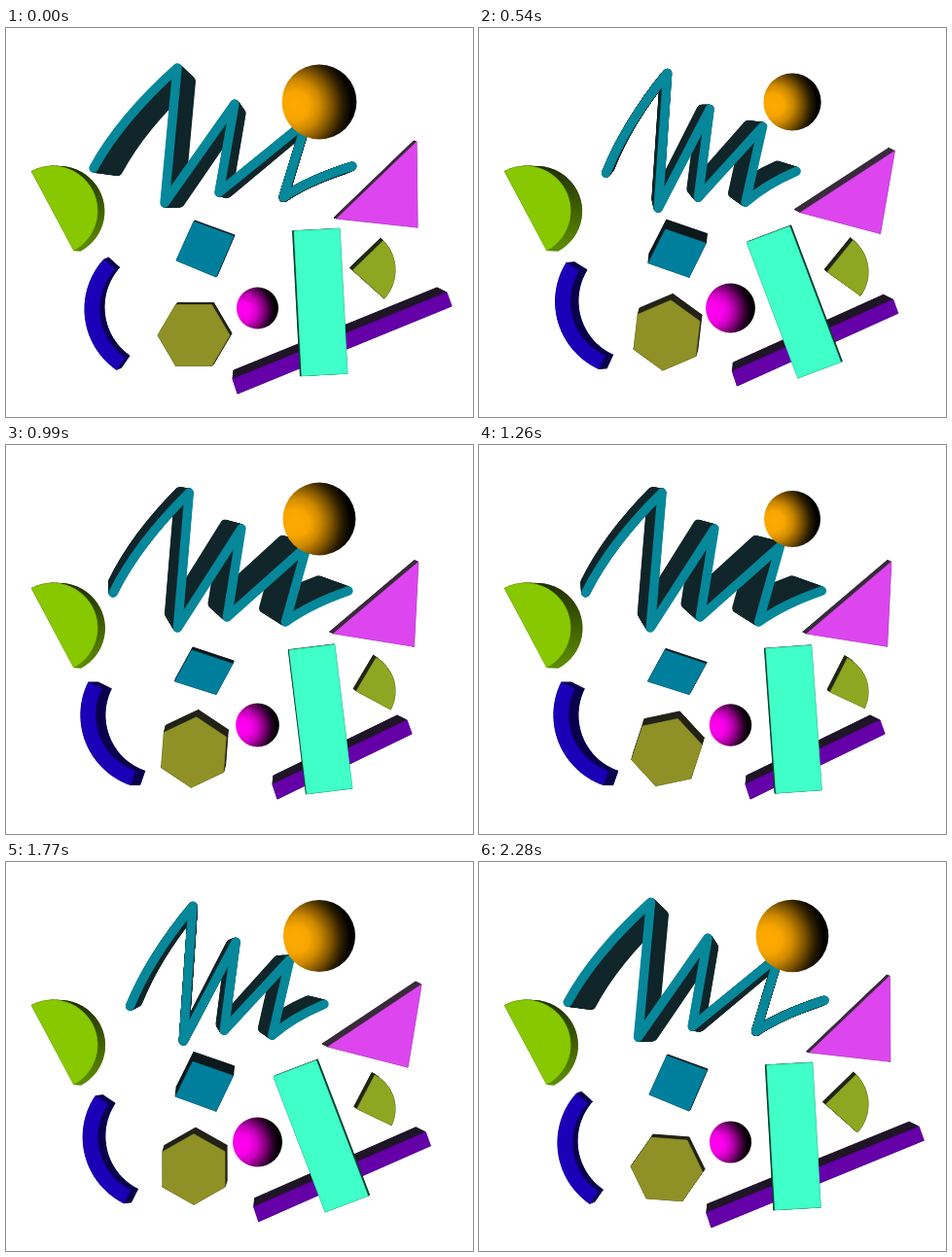
An HTML page with a canvas for the animation above (2310 ms loop, 480 px wide and 400 px high).

```html
<!DOCTYPE html>
<html lang="en">
<head>
<meta charset="utf-8">
<title>Moving solids</title>
<style>
  html, body { margin: 0; width: 100%; height: 100%; overflow: hidden; background: #fff; }
  canvas { display: block; }
</style>
</head>
<body>
<canvas id="stage" width="480" height="400"></canvas>
<script>
const ctx = document.getElementById('stage').getContext('2d');
const LOOP = 2310, STEP = 30, TAU = Math.PI * 2, RAD = Math.PI / 180;
const BEATS = [0, .143, .325, .545, .766, .896, .987, 1];
const SWAY = [0, .4, .88, 1, .53, .24, .02, 0];
const SPIN = [0, -60, -107, -192, -270, -319, -355.5, -360];
const SWING = [0, .16, .58, 1, .97, .32, .02, 0];
const TWIST_BEATS = [0, .091, .286, .41, .532, .649, .792, .974, 1];
const TWIST = [0, .35, .9, 1.05, 1, .65, .52, .03, 0];

// Smooth curve through the given values, continuing across the loop.
function curve(u, beats, values) {
  const n = beats.length - 1;
  const at = i => {
    const lap = Math.floor(i / n), j = i - lap * n;
    return [beats[j] + lap, values[j] + lap * (values[n] - values[0])];
  };
  const slope = i => (at(i + 1)[1] - at(i - 1)[1]) / (at(i + 1)[0] - at(i - 1)[0]);
  let i = 0;
  while (i < n - 1 && beats[i + 1] <= u) i++;
  const [u0, v0] = at(i), [u1, v1] = at(i + 1);
  const d = u1 - u0, x = (u - u0) / d, y = 1 - x;
  return y * y * ((1 + 2 * x) * v0 + x * d * slope(i)) +
    x * x * ((3 - 2 * x) * v1 - y * d * slope(i + 1));
}

const mix = (a, b, k) => a.map((v, i) => v + (b[i] - v) * k);
const polar = (x, y, r, deg) => [x + r * Math.cos(deg * RAD), y + r * Math.sin(deg * RAD)];

function arc(x, y, r, from, to, count = 28) {
  return Array.from({ length: count + 1 }, (_, i) => polar(x, y, r, from + (to - from) * i / count));
}

function rotate(points, cx, cy, deg) {
  const c = Math.cos(deg * RAD), s = Math.sin(deg * RAD);
  return points.map(([x, y]) =>
    [cx + (x - cx) * c - (y - cy) * s, cy + (x - cx) * s + (y - cy) * c]);
}

function fill(points, color) {
  ctx.beginPath();
  points.forEach(p => ctx.lineTo(...p));
  ctx.closePath();
  ctx.fillStyle = ctx.strokeStyle = color;
  ctx.lineWidth = .7;
  ctx.fill();
  ctx.stroke();
}

function solid(front, offset, color, side) {
  const back = front.map((p, i) => {
    const [dx, dy] = typeof offset === 'function' ? offset(i) : offset;
    return [p[0] + dx, p[1] + dy];
  });
  fill(back, side);
  front.forEach((p, i) => {
    const j = (i + 1) % front.length;
    fill([p, front[j], back[j], back[i]], side);
  });
  fill(front, color);
}

// Sphere lit from the left.
function ball(x, y, r, red, green, blue) {
  const gx = x - .66 * r, gy = y + .1 * r;
  const shade = ctx.createRadialGradient(gx, gy, 0, gx, gy, 1.52 * r);
  [[0, 1], [.25, .97], [.45, .8], [.65, .5], [.85, .17], [1, .01]].forEach(([stop, k]) =>
    shade.addColorStop(stop, `rgb(${red * k},${green * k},${blue * k})`));
  ctx.beginPath();
  ctx.arc(x, y, r, 0, TAU);
  ctx.fillStyle = shade;
  ctx.fill();
}

function squiggle(sway, twist) {
  const nodes = [[90, 144], [118, 93], [176, 41], [163, 180], [235, 78], [219, 169],
    [309, 96], [285, 174], [312, 156], [356, 142]]
    .map(([x, y]) => [223 + 8 * sway + (x - 223) * (1 - .25 * twist), y + 8 * sway]);
  const shift = 8 - 23 * sway;
  const trace = (depth, color) => {
    const p = nodes.map(([x, y]) => [
      x + depth * (shift - .125 * (x - 226)),
      y + depth * (2 + .6 * shift - .1 * (y - 110))]);
    ctx.beginPath();
    ctx.moveTo(...p[0]);
    ctx.quadraticCurveTo(...p[1], ...p[2]);
    for (let i = 3; i < 8; i++) ctx.lineTo(...p[i]);
    ctx.quadraticCurveTo(...p[8], ...p[9]);
    ctx.strokeStyle = color;
    ctx.stroke();
  };
  ctx.lineWidth = 9.4;
  ctx.lineCap = ctx.lineJoin = 'round';
  for (let i = 30; i > 0; i--) trace(i / 30, '#11262a');
  trace(0, '#06879a');
  ctx.lineCap = 'butt';
  ctx.lineJoin = 'miter';
}

function draw(u) {
  const sway = curve(u, BEATS, SWAY);
  const swing = curve(u, BEATS, SWING);
  const twist = curve(u * 2 % 1, TWIST_BEATS, TWIST);
  const pulse = (1 - Math.cos(2 * TAU * u - .08)) / 2;
  const beat = Math.cos(TAU * (3 * u - .125));

  ctx.fillStyle = '#fff';
  ctx.fillRect(0, 0, 480, 400);

  squiggle(sway, twist);
  ball(322, 76, 34.5 + 5.5 * beat, 255, 170, 0);

  // Half disc
  const rim = ctx.createLinearGradient(0, 145, 0, 225);
  rim.addColorStop(0, '#223200');
  rim.addColorStop(1, '#5c8a00');
  solid(arc(48, 188, 46, -118, 62), [9 - 3 * beat, .5], '#88c800', rim);

  // Triangle
  solid([
    mix([340, 196], [331, 190], twist),
    mix([422, 117], [427, 126], twist),
    mix([423, 205], [413, 211], twist)
  ], [-3 - 3 * twist, -1 - 2 * twist], '#dd46ef', '#382a3b');

  // Square
  solid([
    mix([193, 199], [191, 211], sway),
    mix([234, 214], [233, 225], sway),
    mix([216, 256], [216, 256.5], sway),
    mix([175, 239], [173.5, 243], sway)
  ], [1, -1 - 9 * pulse], '#007f9d', '#0c181b');

  // Wedge
  const tip = [356.5 + 4.5 * swing, 249 + 5 * swing];
  const reach = 43.5 - 4.5 * swing;
  solid([tip, ...arc(...tip, reach, -44 - 19 * swing, 42 - 17 * swing)],
    [-3, -2.5], '#8fa622', '#222512');

  // Curved bar
  const cx = 157 - 2 * sway;
  const band = [...arc(cx, 289, 76, 222, 125), ...arc(cx, 289, 61, 125, 222)];
  solid(rotate(band, 113, 291, -15.7 * sway), [5 + 5 * sway, -2 + 2 * sway], '#1b00b8', '#0b004c');

  // Hexagon
  const turn = curve(u, BEATS, SPIN);
  const hexagon = arc(193, 0, 37, turn, turn + 300, 5).map(([x, y]) => [x, 316 + y * .98]);
  solid(hexagon, [2, -2 - 5.5 * Math.sqrt(Math.sin(Math.PI * u))], '#8f9126', '#222216');

  ball(258.5, 288, 21.5 + 4 * pulse, 255, 0, 240);

  // Long bar
  const left = mix([238, 376], [279, 364], sway);
  const right = mix([458, 286], [417, 297], sway);
  solid([left, right, [right[0] - 5, right[1] - 14], [left[0] - 5, left[1] - 15]],
    i => i === 1 || i === 2 ? [-10, -5] : [1, -9], '#6500a9', '#1f1527');

  // Upright box
  const box = [[300, 207.5], [347, 207.5], [347, 356.5], [300, 356.5]];
  solid(rotate(box, 323.5, 282, -3 - 18 * pulse),
    [-1.5 + 3 * pulse, -pulse], '#40ffc8', '#0c3f31');
}

function tick(now) {
  draw(Math.floor(now % LOOP / STEP) * STEP / LOOP);
  requestAnimationFrame(tick);
}
requestAnimationFrame(tick);
</script>
</body>
</html>
```
